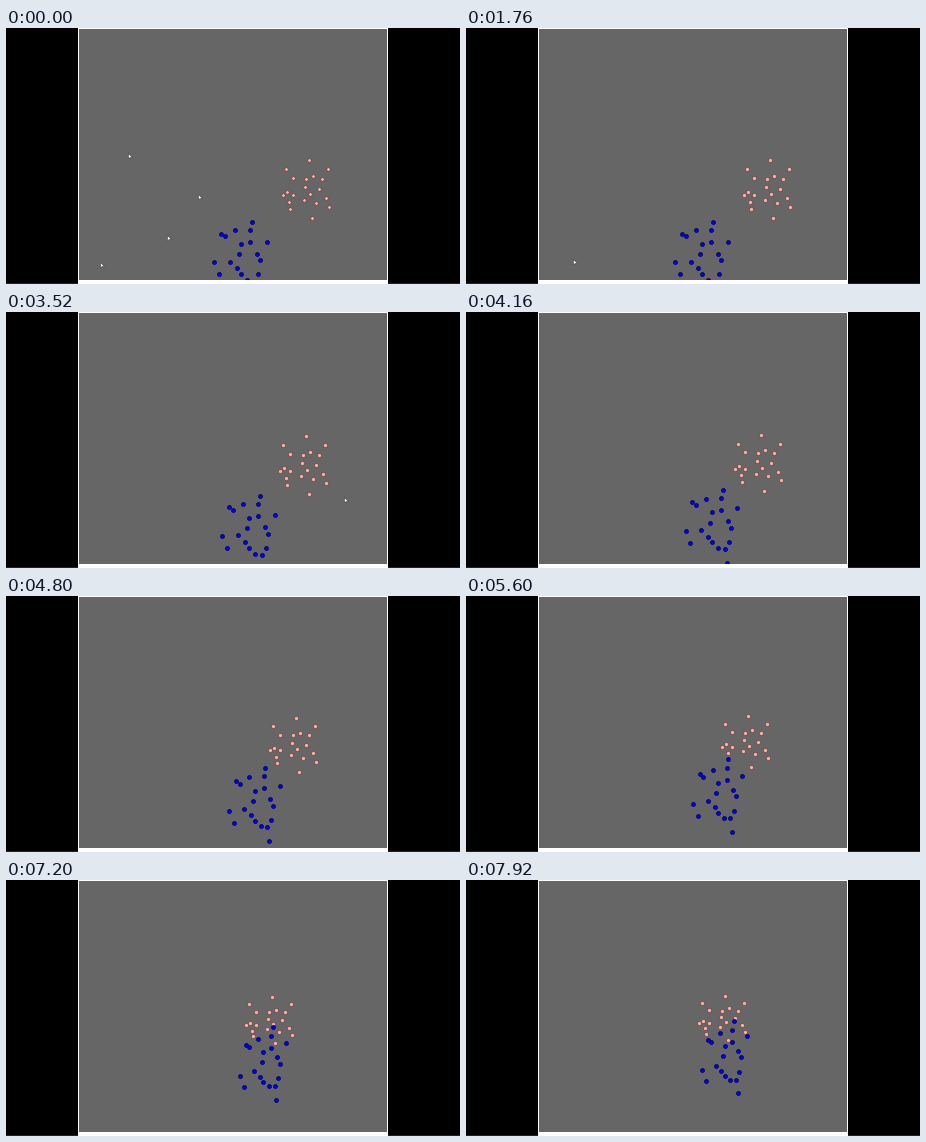
Animation, 454 px wide and 256 px high, one loop 8000 ms. Source, as a matplotlib script:

```python
import numpy as np
import matplotlib.pyplot as plt
from matplotlib.animation import FuncAnimation
from matplotlib.patches import Rectangle
from matplotlib.path import Path

W, H, DPI = 454, 256, 100
FRAMES, STEP = 100, 80
START = 13              # frame at which the flocks wake up
PX = 72 / DPI           # one pixel in points

# A flock is one formation that drifts along a path while it slowly deforms.
KEYS = (1760, 2640, 3520, 4800, 6480, 7920)     # ms
WARP = (0, 0, 0, 0.3, 0.75, 1)

BLUE = dict(
    home=[(254, 184), (223, 195), (227, 198), (237, 192), (252, 192),
          (269, 203), (243, 206), (252, 204), (241, 216), (259, 215),
          (262, 222), (216, 224), (232, 223), (239, 230), (243, 236),
          (260, 236), (221, 236), (249, 242), (256, 243), (258, 257)],
    drift=((-7, -4, 0, 6, 13, 16), (10.5, 7, 0, -11, -28, -40)),
    squeeze=[(-0.15, 0), (-0.25, 0)], center=(242, 215))

PINK = dict(
    home=[(300, 124), (277, 133), (319, 133), (304, 140), (297, 143),
          (284, 142), (313, 143), (296, 151), (278, 156), (274, 159),
          (284, 159), (310, 153), (301, 158), (295, 164), (317, 162),
          (280, 166), (307, 167), (281, 173), (320, 171), (303, 182)],
    drift=((3.7, 5, 0, -10, -27, -41), (8, 3.5, 0, -4, -10, -14)),
    squeeze=[(0, 0), (0, -0.235)], center=(298, 150))

# Resting pointers: (x, y, frame at which it vanishes)
POINTERS = [(123, 128, START), (193, 169, 5), (162, 210, 7), (95, 237, 1)]


def flock(home, drift, squeeze, center, frame):
    t = frame * STEP
    home = np.array(home, float)
    bend = (home - center) @ np.transpose(squeeze)
    pos = home + bend * np.interp(t, KEYS, WARP)
    pos += [np.interp(t, KEYS, d) for d in drift]
    if frame < START:
        pos -= (1, 0)
    return np.round(pos) - 0.5


def pointers(frame):
    spots = [(x, y) for x, y, end in POINTERS if frame < end]
    if 1 <= frame < 10:
        u = min((frame - 1) / 7, 1)
        spots.append((320 - 181 * u, 143 + 107 * u))
    elif 20 <= frame <= 22:
        u = (frame - 20) / 2
        spots.append((101 + 7 * u, 239 - 5 * u))
    elif frame >= START and frame % 9 == 8:
        spots.append((339, 188))
    return np.round(np.reshape(spots, (-1, 2))) + (0.5, -0.5)


fig = plt.figure(figsize=(W / DPI, H / DPI), dpi=DPI, facecolor="black")
ax = fig.add_axes([0, 0, 1, 1])
ax.set_xlim(0, W)
ax.set_ylim(H, 0)
ax.axis("off")


def box(x, y, w, h, color, z):
    ax.add_patch(Rectangle((x, y), w, h, fc=color, lw=0, zorder=z,
                           antialiased=False))


def markers(shape, size, face, edge, width, z):
    return ax.plot([], [], ls="", marker=shape, ms=size * PX, mfc=face,
                   mec=edge, mew=width * PX, zorder=z)[0]


box(0, 255, W, 1, "#2a2024", 0)
box(72, 0, 310, H, "white", 1)
box(73, 1, 308, 251, "#666666", 2)
box(72, 252, 310, 4, "white", 6)

arrow = Path([(-2, 3), (2, -1), (0, -1), (-2, -2), (-2, 3)], closed=True)
blue_dots = markers("o", 4, "#0000e0", "#000070", 0.7, 4)
pink_dots = markers("o", 4, "#f8b0a8", "#6a3c3c", 0.6, 3)
arrows = markers(arrow, 6, "white", "#333333", 0.5, 5)


def draw(frame):
    pink_dots.set_marker("o" if frame >= START else "D")
    pink_dots.set_markersize((4 if frame >= START else 3.4) * PX)
    blue_dots.set_data(*flock(frame=frame, **BLUE).T)
    pink_dots.set_data(*flock(frame=frame, **PINK).T)
    arrows.set_data(*pointers(frame).T)
    return blue_dots, pink_dots, arrows


anim = FuncAnimation(fig, draw, frames=FRAMES, interval=STEP,
                     repeat=True, repeat_delay=0)
plt.show()
```
